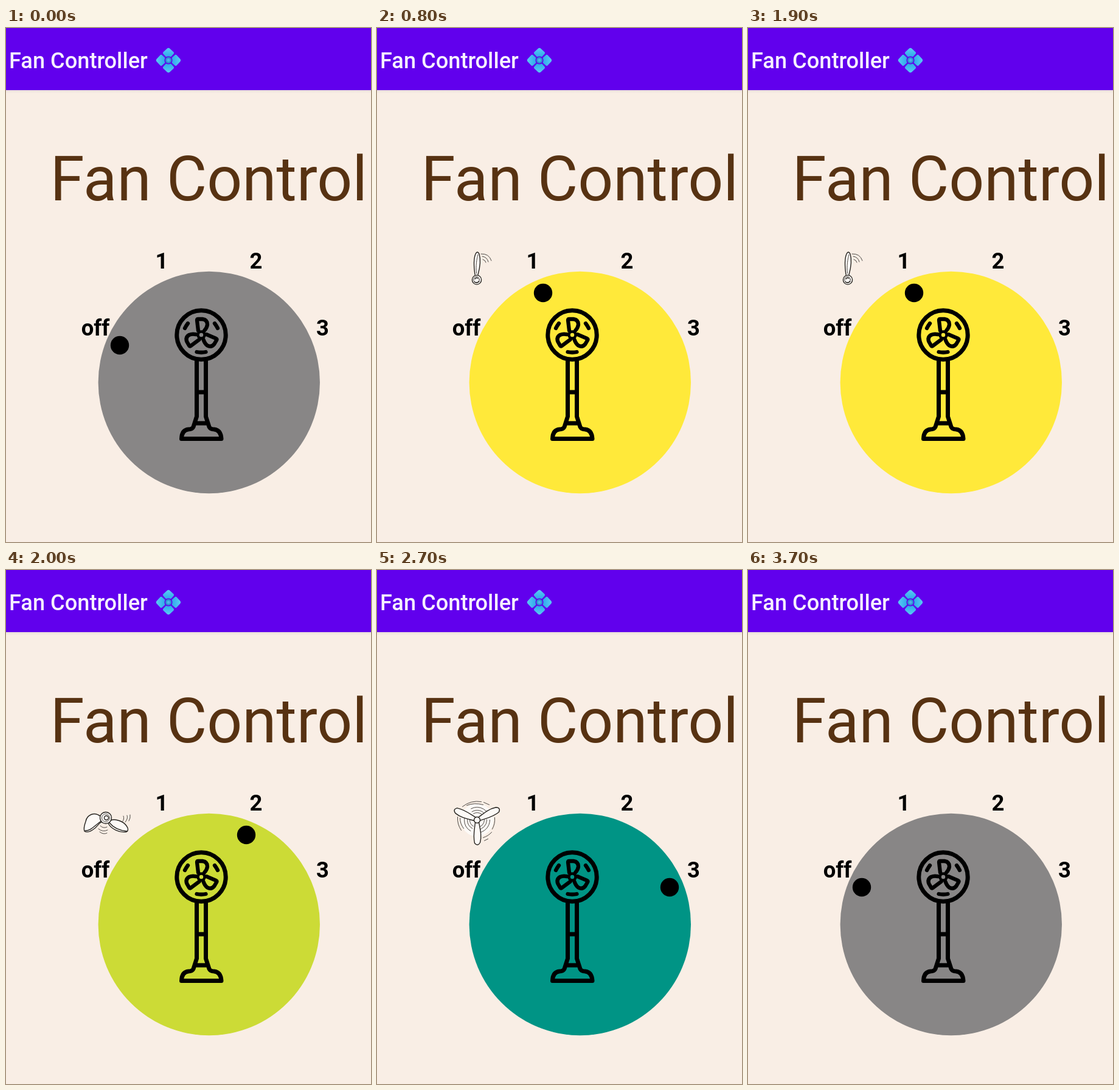
These frames come from a looping animation (600 px wide and 844 px high, 3800 ms). An HTML page:

```html
<!DOCTYPE html>
<html lang="en">
<head>
<meta charset="utf-8">
<title>Fan Controller</title>
<style>
  html, body { margin: 0; width: 100%; height: 100%; overflow: hidden; background: #f9eee5; }
  svg { display: block; width: 600px; height: 844px; }
  text { font-family: Roboto, "Liberation Sans", sans-serif; }
  .bar { font-size: 36.2px; font-weight: 500; fill: #f6f0fe; }
  .title { font-size: 101.8px; fill: #573212; }
  .label { font-size: 36.4px; font-weight: 700; text-anchor: middle; }
  .fan, .sketch { fill: none; stroke-linecap: round; stroke-linejoin: round; }
  .fan { stroke: #000; stroke-width: 7; }
  .sketch { stroke: #26231f; stroke-width: 1.4; visibility: hidden; }
  .sketch .thin { stroke-width: 1; stroke: #4c4844; }
  .sketch .fill { fill: #fdfaf7; }
</style>
</head>
<body>
<svg viewBox="0 0 600 844">
  <defs>
    <linearGradient id="shade" x2="0" y2="1">
      <stop stop-color="#e9deda"/>
      <stop offset="1" stop-color="#f9eee5"/>
    </linearGradient>
    <linearGradient id="gem" x2="0" y2="1">
      <stop stop-color="#5acbf5"/>
      <stop offset="1" stop-color="#2fa8ea"/>
    </linearGradient>
    <path id="petal" d="M-2 -19.500 Q0 -21 2 -19.500 L8.500 -13.500 Q10 -12 8.500 -10.500 L4 -5.500 Q0 -7.500 -4 -5.500 L-8.500 -10.500 Q-10 -12 -8.500 -13.500 Z"/>
    <path id="blade" d="M-5 -7 L-7 -24 Q-7 -26 -5 -26 H2 Q10 -25 10 -17 Q9.500 -12 5 -7"/>
    <path id="prop" d="M-3 -4 C-5 -15 -8 -25 -5 -37 Q-1 -44 4 -38 C7 -26 4 -14 3 -4 Z"/>
  </defs>

  <rect width="600" height="844" fill="#f9eee5"/>
  <rect y="102" width="600" height="5" fill="url(#shade)"/>
  <rect width="600" height="102" fill="#6100ed"/>
  <text class="bar" x="5" y="66">Fan Controller</text>
  <g transform="translate(267 53)" fill="url(#gem)">
    <use href="#petal"/>
    <use href="#petal" transform="rotate(90)"/>
    <use href="#petal" transform="rotate(180)"/>
    <use href="#petal" transform="rotate(270)"/>
    <circle r="5" fill="#2f93d6"/>
    <circle r="2.500" fill="#4db4e8"/>
  </g>

  <text class="title" x="72.500" y="283">Fan Control</text>

  <circle id="dial" cx="333.800" cy="582" r="182.200"/>
  <circle id="dot" r="15.200"/>
  <text class="label" x="147" y="505">off</text>
  <text class="label" x="256" y="395">1</text>
  <text class="label" x="411" y="395">2</text>
  <text class="label" x="520.500" y="505">3</text>

  <g class="fan">
    <circle cx="321" cy="504" r="40.200"/>
    <g transform="translate(321 504)" stroke-width="6.300">
      <circle r="5.500" stroke-width="4.500"/>
      <use href="#blade"/>
      <use href="#blade" transform="rotate(120)"/>
      <use href="#blade" transform="rotate(240)"/>
      <path d="M-27 -11 Q-25 -15 -22 -19 M22 -19 Q25 -15 27 -11 M-7.500 28 Q0 29.500 7.500 28"/>
    </g>
    <path d="M313.500 546 V638 L308 655 Q306 659 300 659 Q289 660 288.500 674.500 H354 Q353 660 342 659 Q336 659 334 655 L328.500 638 V546 M313.500 598 H328.500 M311 649 H331"/>
  </g>

  <g class="sketch">
    <path class="fill" d="M161 405 C159 391 159 378 162 371 Q165 365 168 371 C171 381 169 394 166 405"/>
    <path class="thin" d="M163.500 403 C162 390 164 379 166 372"/>
    <circle class="fill" cx="164" cy="413.500" r="7.600"/>
    <circle class="thin" cx="163.500" cy="413" r="4.800"/>
    <path d="M161 412 Q163 409 166 411 M160 417 Q164 420 168 416"/>
    <path class="thin" d="M171 371 Q184 370 188 382 M173 375 Q181 376 183 384 M174 380 Q178 381 179 385"/>
  </g>

  <g class="sketch">
    <path class="fill" d="M156 405 C145 396 133 402 131 413 Q127 424 129 429 Q134 432 142 427 C152 421 151 416 158 413 Z"/>
    <path class="fill" d="M172 411 C181 408 193 413 198 420 Q203 427 198 430 C186 432 173 425 168 416 Z"/>
    <path d="M130 428 C139 429 146 419 157 412 M170 415 C178 425 188 428 199 429"/>
    <circle class="fill" cx="164" cy="407" r="9.500"/>
    <circle class="thin" cx="164" cy="407" r="6.500"/>
    <circle cx="165" cy="407" r="3.500"/>
    <path class="thin" d="M191 414 Q195 409 193 404 M196 414 Q201 408 199 403 M202 412 Q205 407 204 402 M155 420 Q160 425 166 422 M152 425 Q159 431 167 427 M154 430 Q160 435 166 432"/>
  </g>

  <g class="sketch" transform="translate(164.500 410.500)">
    <circle r="27" fill="#fdfaf7" stroke="none"/>
    <g class="thin">
      <circle r="12" stroke-dasharray="20 5"/>
      <circle r="16" stroke-dasharray="26 7"/>
      <circle r="21" stroke-dasharray="33 11"/>
      <path d="M-24 -22 Q-10 -33 7 -30 M-17 -24 Q-4 -29 10 -25 M11 -29 L20 -25 M-32 -5 Q-33 7 -26 17 M-28 -3 Q-28 6 -22 14 M29 -4 Q30 6 25 15 M10 29 Q19 26 24 20 M12 34 L18 31"/>
    </g>
    <g class="fill">
      <use href="#prop" transform="rotate(-65)"/>
      <use href="#prop" transform="rotate(64)"/>
      <use href="#prop" transform="rotate(180)"/>
      <circle r="5"/>
    </g>
  </g>
</svg>
<script>
  const LOOP = 3800;
  // start time, dial colour, dot x, dot y, icon index
  const steps = [
    [0, '#888686', 187, 521, -1],
    [800, '#ffe93a', 273, 435, 0],
    [2000, '#ccdb36', 395, 435, 1],
    [2700, '#009485', 481, 521, 2],
    [3600, '#888686', 187, 521, -1]
  ];
  const dial = document.getElementById('dial');
  const dot = document.getElementById('dot');
  const icons = document.querySelectorAll('.sketch');
  let shown;

  function show(step) {
    const [, color, x, y, icon] = step;
    dial.setAttribute('fill', color);
    dot.setAttribute('cx', x);
    dot.setAttribute('cy', y);
    icons.forEach((el, i) => { el.style.visibility = i === icon ? 'visible' : 'hidden'; });
    shown = step;
  }

  const start = performance.now();
  function tick() {
    const t = (performance.now() - start) % LOOP;
    const step = steps.findLast(s => s[0] <= t);
    if (step !== shown) show(step);
    requestAnimationFrame(tick);
  }
  tick();
</script>
</body>
</html>
```
